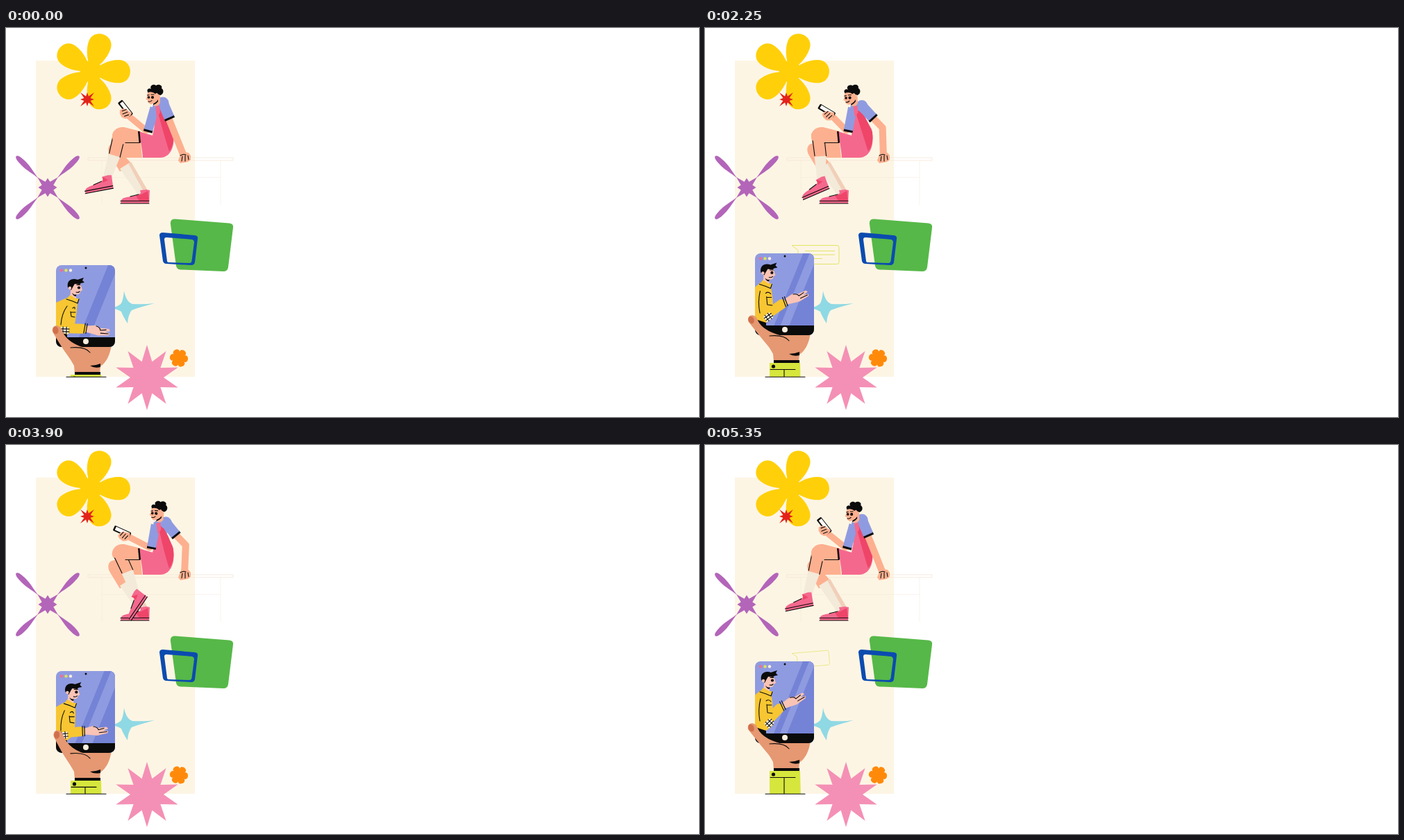
Recreate the animation shown at these times as an HTML page. Size 998 px wide and 561 px high, loop 5400 ms.

```html
<!DOCTYPE html>
<html lang="en">
<head>
<meta charset="utf-8">
<title>Chatting friends</title>
<style>
  html, body { margin: 0; width: 100%; height: 100%; overflow: hidden; background: #fff; }
  svg { display: block; width: 100%; height: 100%; }
  .ink { fill: none; stroke: #0b0b0b; stroke-width: 1.1; stroke-linecap: round; stroke-linejoin: round; }
  .limb { fill: none; stroke-linejoin: round; }
  .desk { fill: none; stroke: #f3e2d2; stroke-width: .7; }
</style>
</head>
<body>
<svg id="stage" viewBox="0 0 998 561" xmlns="http://www.w3.org/2000/svg"></svg>
<script>
const SKIN = '#fdb08f', BLUE = '#8f9be0', ROSE = '#f5688d', RED = '#ee4569';
const TAN = '#e59872', PALE = '#f9c3b5', YELLOW = '#f7c632', LIME = '#d7e63c', INK = '#0b0b0b';
const SOCK = '#f3ead9';

// ---------- shape helpers ----------
const polar = (r, deg) => [r * Math.cos(deg * Math.PI / 180), r * Math.sin(deg * Math.PI / 180)];

// Radii cycle through the list, one per vertex.
function star(x, y, vertices, radii, turn, color) {
  const points = Array.from({ length: vertices }, (_, i) => {
    const [dx, dy] = polar(radii[i % radii.length], turn + i * 360 / vertices);
    return `${(x + dx).toFixed(1)},${(y + dy).toFixed(1)}`;
  });
  return `<polygon points="${points.join(' ')}" fill="${color}"/>`;
}

function flower(x, y, petals, scale, girth, turn, color) {
  const petal = 'M0 0C12-9 26-18 43-18C67-18 67 18 43 18C26 18 12 9 0 0';
  const parts = Array.from({ length: petals }, (_, i) =>
    `<path d="${petal}" transform="rotate(${turn + i * 360 / petals}) scale(1 ${girth})"/>`);
  return `<g transform="translate(${x} ${y}) scale(${scale})" fill="${color}"><circle r="17"/>${parts.join('')}</g>`;
}

const fill = (color, d, extra = '') => `<path fill="${color}" d="${d}" ${extra}/>`;
const ink = (d, extra = '') => `<path class="ink" d="${d}" ${extra}/>`;
const limb = (id, color, width, cap = 'butt') =>
  `<path id="${id}" class="limb" stroke="${color}" stroke-width="${width}" stroke-linecap="${cap}"/>`;
const dot = (x, y, r, color) => `<circle cx="${x}" cy="${y}" r="${r}" fill="${color}"/>`;

const shoe = tongue =>
  fill(ROSE, 'M-8-1L-7 3C-13 9-31 7-35 13L-36 18H5L6-1L1-2Z') +
  (tongue ? fill(RED, 'M-14 7L-6 5L3 0L5 14H-9Z') : fill(RED, 'M-7-1L0 5L-8 7Z')) +
  ink('M-36 14.500H5M-22 8L-10 5') + ink('M-36 18H5', 'stroke-width=".7"');

// ---------- scene ----------
const decor =
  fill('#fdf5e4', 'M43 47H272V503H43Z') +
  flower(122.5, 62.7, 5, .925, 1, 0, '#ffd009') +
  star(117, 103, 16, [14, 5, 10, 5], -45, '#e3231b') +
  star(60, 230, 16, [13.5, 9, 21, 9], 0, '#b365b9') +
  [45, 135, 225, 315].map(a =>
    fill('#b365b9', 'M19 0C30-1 38-4 49-4C58-4 64-3 64 0C64 3 58 4 49 4C38 4 30 1 19 0',
      `transform="translate(60 230) rotate(${a})"`)).join('') +
  fill('#56b848', 'M244 275.5L321 281.5Q328 282 327 288L320 345Q319 351 313 351L251 348.5Q246 348 245 343L237 283Q236 275 244 275.5Z') +
  fill('#0b4bb0', 'M226 295L272 299Q277 300 276 304L272 338Q271 342 267 342L231 340Q227 340 226 336L221 299Q221 295 226 295Z' +
    'M231 302Q228 302 228 305L232 336Q232 338 235 338L264 339Q267 339 267.500 336L271 309Q271 306 268 305Z', 'fill-rule="evenodd"') +
  fill('#8fd9e4', 'M170 379Q173 395 182 398Q198 399 214 397Q191 403 181 407Q176 413 175 426Q168 415 166 409Q160 405 150 404Q162 402 166 397Q169 391 170 379Z') +
  star(203, 504, 20, [47, 24], -90, '#f490b5') +
  flower(249, 476, 6, .215, 1.25, 7, '#ff8a0a') +
  '<path class="desk" d="M118 187H327V191H118Z"/>' +
  '<path class="desk" opacity=".6" d="M138 191V255M309 191V255M138 215.500H309"/>';

const head =
  fill(SKIN, 'M213 101L222 98L222 108Q219 114 213 112Z') +
  fill(SKIN, 'M204 92L203 99L201.500 103L204 104Q204 109 209 110Q215 109 217 101L219 93Z') +
  fill(INK, 'M204 92C202 89 206 86 209 88C206 83 213 80 216 83C220 80 226 83 224 87C228 89 227 96 222 97L219 96Q218 92 215 95Q211 91 204 93Z') +
  dot(219, 98, 2.4, SKIN) + dot(205.500, 100, 1.8, INK) + dot(211, 100, 2.1, INK) +
  ink('M203.500 97L206 96.500M209 96L213 96M205 106Q208 107 210 104.500') +
  fill(INK, 'M212 109Q217 107 219 103L219 106Q216 110 212 111Z');

const woman =
  fill(SKIN, 'M194 166H158C147 166 145 175 150 184L164 207L181 196L173 187H196Z') +
  fill(SOCK, 'M164 203L180 193L205 236L190 240Z') +
  fill('#f1cfb9', 'M176 195L180 193L205 236L199 237Z') +
  `<g transform="translate(201 235)">${shoe(true)}</g>` +
  `<g id="shin">` +
    fill(SKIN, 'M-11-3C-10-8 9-9 10 6L8 31H-8Z') +
    fill(SOCK, 'M-8 29L9 29L6 63H-6Z') +
    ink('M-9.500 2L-7.500 28M8 10L9 29') +
    `<g id="foot">${shoe(false)}</g></g>` +
  fill(SKIN, 'M194 149L170 143C158 142 150 151 154 162L172 166L194 166Z') +
  ink('M172 165.500H193') +
  `<path id="shirt" fill="${BLUE}"/><path id="overalls" fill="${ROSE}"/><path id="overallsShade" fill="${RED}"/>` +
  fill(INK, 'M190 149L192.500 149L194 165L191.500 165Z') +
  limb('rightArm', SKIN, 10) + limb('rightCuff', INK, 15) + limb('rightSleeve', BLUE, 15) +
  `<circle id="shoulder" r="8.500" fill="${BLUE}"/>` +
  fill(SKIN, 'M253 178L263 180L266 184L266 190L262 193L251 195L248 191Z') +
  ink('M251 184Q256 181 259 183M254 185L253 192M258 184V192M262 184L263 190') +
  limb('forearm', SKIN, 9, 'round') + limb('leftCuff', INK, 13) + limb('leftSleeve', BLUE, 13) +
  `<path id="strap" fill="${ROSE}"/>` +
  `<g id="head">${head}</g>` +
  `<g id="handset"><rect x="-13" y="-4" width="26" height="8" rx="1.500" fill="${INK}"/>` +
    fill('#fffdf8', 'M-10.500-3H11V2H-10.500Z') +
    fill(SKIN, 'M-3 8L-2 3L2-1L5-1L11-3L13 1L12 9L7 12L1 11Z') +
    ink('M2 0L0 6M6 1L4 8M10 2L8 8', 'stroke-width=".8"') + '</g>';

const manHead =
  fill(PALE, 'M84 22H99L102 31L99 33Q99 38 93 37L93 44L84 42L85 32Z') +
  fill(INK, 'M81 27C79 17 87 13 95 16L104 13L102 17L105 20L100 21L98 23L91 22L88 27L86 31Z') +
  dot(84, 28, 2.2, PALE) + dot(97, 27.500, 2.1, INK) +
  ink('M94 23.500L99 23.500M93 34Q96 35 98 33') + fill(INK, 'M87 35Q91 39 93 37L93 40Q89 40 87 35Z');

const device =
  '<g id="bubble" fill="none" stroke="#e2e465" stroke-width="1">' +
    '<path d="M0 0H65Q68 0 68 3V24Q68 27 65 27H12Q9 27 9 24V7Z"/>' +
    '<path id="bubbleText" d="M19 8H62M19 13.500H62M19 19H44"/></g>' +
  fill(TAN, 'M80 114L98 145L99 156H135L136 146Q149 137 152 114Z') +
  fill(INK, 'M99 154H136V158H99ZM121 145Q129 145 136 142V147Q127 149 121 145Z') +
  fill(LIME, 'M93 158H137L138 200H93Z') + dot(98.500, 163, 2.6, INK) + ink('M94 167.500H130M114 168V200') +
  '<g clip-path="url(#screen)">' +
    `<rect x="72" width="85" height="118" fill="${BLUE}"/>` +
    '<path id="glassShade" fill="#7583d6"/><path id="glassShine" fill="#8f9be0"/>' +
    dot(80, 7.500, 2.2, '#ee6f91') + dot(86.500, 7.500, 2.2, '#dbe25a') + dot(93, 7.500, 2.2, '#fbeee0') + dot(115, 4, 1.5, INK) +
    fill(INK, 'M72 92H88V105H72Z') +
    `<path id="jacket" fill="${YELLOW}"/>` +
    `<g id="manHead">${manHead}` +
      fill(YELLOW, 'M79 44L84 38L92 43L97 43L95 50L88 47Z') + ink('M79 44L88 47L95 50L97 44') + '</g>' +
    limb('sleeve', YELLOW, 14, 'round') +
    '<path id="jacketLines" class="ink"/>' +
    `<g id="palm">` + fill(PALE, 'M-3-4L10-7L16-4L29-5L31-2L24 0L31 1L30 4L15 7L-3 5Z') +
      ink('M10-6Q16-5 17-1L25-3M18 3L29 2') + ink('M-3-7V7M-6-7V7') + '</g>' +
    `<g id="patch"><rect x="-6" y="-4.500" width="11" height="9" fill="#fff8ec"/>` + ink('M-6-2H6M-6 2H6M-3-5V5M2-5V5') + '</g>' +
    fill(INK, 'M72 104H157V118H72Z') + dot(115, 110, 4, '#fdeede') + '</g>' +
  `<path id="thumb" fill="${TAN}"/><ellipse id="nail" rx="4" ry="5.500" fill="#d0704c"/>` +
  ink('M93 119Q114 117 121 126', 'stroke-width="1.500"');

const stage = document.getElementById('stage');
stage.innerHTML =
  '<defs><clipPath id="ground"><path d="M0 0H998V503H0Z"/></clipPath>' +
  '<clipPath id="screen"><rect x="72" width="85" height="118" rx="8"/></clipPath></defs>' +
  decor + woman + `<g clip-path="url(#ground)"><g id="device">${device}</g></g>` + ink('M87 503.300H144');

// ---------- motion ----------
const parts = Object.fromEntries([...stage.querySelectorAll('[id]')].map(el => [el.id, el]));
const set = (id, name, value) => parts[id].setAttribute(name, value);
const mix = (a, b, k) => a + (b - a) * k;
const ramp = (t, from, to) => {
  const k = Math.min(1, Math.max(0, (t - from) / (to - from)));
  return k * k * (3 - 2 * k);
};

// Smooth periodic curve through the given values, without overshoot.
function track(times, period, values) {
  const n = times.length;
  const at = i => times[(i + n) % n] + period * Math.floor(i / n);
  const value = i => values[(i + n) % n];
  const slope = i => (value(i + 1) - value(i)) / (at(i + 1) - at(i));
  const tangent = i => {
    const a = slope(i - 1), b = slope(i);
    return a * b <= 0 ? 0 : 2 * a * b / (a + b);
  };
  return t => {
    let i = n - 1;
    while (times[i] > t) i--;
    const h = at(i + 1) - at(i), k = (t - at(i)) / h;
    return mix(value(i), value(i + 1), k * k * (3 - 2 * k)) +
      h * k * (1 - k) * ((1 - k) * tangent(i) - k * tangent(i + 1));
  };
}

const LOOP = 5400, SWING = 2700, LIFT = 4500;
const sit = (...v) => track([0, 850, 1750, 2800, 3450, 4300], LOOP, v);
const hold = (...v) => track([0, 850, 1750, 2800, 3450, 4300], LIFT, v);

const sitting = {
  headX: sit(0, -5, -6.5, 4.5, 7, 2.5), headY: sit(0, 1, 1.5, -1, -1, -1), headTurn: sit(0, -6, -8, 3, 6, 2),
  lean: sit(0, -3, -4, 2, 3, 0),
  shoulderX: sit(226, 222, 222, 231, 232, 228), shoulderY: sit(108, 111, 111, 114, 114, 110),
  cuffX: sit(235, 237, 237, 246, 246, 241),
  elbowX: sit(241, 250, 252, 260, 262, 254), elbowY: sit(147, 143, 142, 146, 146, 143),
  leftX: sit(205, 204, 204, 210, 211, 208),
  handX: sit(172, 177, 179, 169.5, 167, 167.5), handY: sit(116, 114, 115.5, 124, 126, 123),
  handTurn: sit(52, 43, 39, 22, 20, 31)
};
const holding = {
  y: track([0, 850, 1750, 2275, 2800, 3450, 4300], LIFT, [342, 312, 321.5, 325, 321.5, 314, 339.5]),
  headX: hold(8, 0, -2, 1, 0, 8), headY: hold(5, 0, 0, 1, 0, 5.5),
  elbowX: hold(84, 92, 93, 86, 82, 83), elbowY: hold(91, 86, 88, 89, 88, 91),
  wristX: hold(119, 116, 121, 117, 115, 118), wristY: hold(92, 62, 66, 71, 80, 91),
  palmTurn: hold(10, -25, -21, -19, -15, 9),
  thumbX: hold(73, 68, 66, 72, 75, 74), thumbY: hold(93, 95, 97, 92, 91, 92)
};
const pose = (tracks, t) => Object.fromEntries(Object.entries(tracks).map(([k, f]) => [k, f(t)]));
const line = (x1, y1, x2, y2) => `M${x1} ${y1}L${x2} ${y2}`;

// A sleeve from a to b, with a dark cuff slightly past its end.
function drawSleeve(sleeve, cuff, ax, ay, bx, by) {
  const len = Math.hypot(bx - ax, by - ay), ux = (bx - ax) / len, uy = (by - ay) / len;
  set(sleeve, 'd', line(ax, ay, bx, by));
  set(cuff, 'd', line(bx - ux, by - uy, bx + ux * 3, by + uy * 3));
}

function drawWoman(t) {
  const p = pose(sitting, t), s = p.lean;
  const leg = 4.5 - 24 * Math.cos(2 * Math.PI * (t - 200) / SWING);
  const bend = Math.max(0, leg);
  const tilt = 21 + .6 * leg + .05 * bend * bend;
  set('shin', 'transform', `translate(164 156) rotate(${-leg})`);
  set('foot', 'transform', `translate(0 61) rotate(${leg - tilt})`);

  set('shirt', 'd', `M${211 + s} 112L${219 + s} 106L${230 + s} 107L232 135L215 150L${212 + s} 130Z`);
  set('overalls', 'd', `M191 149L211 155L${215 + s} 136L${217 + s} 112H${222 + s}L240 146C245 168 238 187 222 187H197Q196 172 191 149Z`);
  set('overallsShade', 'd', `M${222 + s} 113L${233 + s / 2} 132L241 150Q243 168 235 178Q228 156 ${220 + s} 126Z`);
  set('strap', 'd', `M${215 + s} 113L${221 + s} 112L${222 + s} 122L${217 + s} 128Z`);

  set('rightArm', 'd', `M${p.cuffX - 2} 127L${p.elbowX} ${p.elbowY}L257 187`);
  drawSleeve('rightSleeve', 'rightCuff', p.shoulderX, p.shoulderY, p.cuffX, 129);
  set('shoulder', 'cx', p.shoulderX);
  set('shoulder', 'cy', p.shoulderY);

  const a = p.handTurn * Math.PI / 180, cos = Math.cos(a), sin = Math.sin(a);
  set('forearm', 'd', line(p.leftX - 3, 148, p.handX + 12 * cos - 3 * sin, p.handY + 12 * sin + 3 * cos));
  drawSleeve('leftSleeve', 'leftCuff', 214 + s, 115, p.leftX, 147);
  set('handset', 'transform', `translate(${p.handX} ${p.handY}) rotate(${p.handTurn})`);
  set('head', 'transform', `translate(${p.headX} ${p.headY}) rotate(${p.headTurn} 215 105)`);
}

function drawDevice(t) {
  const p = pose(holding, t), { headX: x, headY: y, thumbX: tx, thumbY: ty } = p;
  set('device', 'transform', `translate(0 ${p.y})`);

  const size = ramp(t, 550, 980) * (1 - ramp(t, 2400, 2900));
  set('bubble', 'transform', `translate(125 -11.500) rotate(${-22 * (1 - size)}) scale(${size})`);
  set('bubble', 'opacity', .5 + .5 * size);
  set('bubbleText', 'opacity', ramp(t, 950, 1350) * size);

  const k = Math.min(1, (342 - p.y) / 18);
  const shade = mix(147, 141, k), shine = mix(162, 150, k), wide = mix(60, 10, k);
  set('glassShade', 'd', `M${shade} 0H220V104H${shade - 42}Z`);
  set('glassShine', 'd', `M${shine} 0h${wide}l-42 104h${-wide}Z`);

  set('jacket', 'd', `M70 ${50 + y}L${80 + x} ${42 + y}L${95 + x} ${47 + y}Q${99 + x / 2} 62 98 92L88 100L70 94Z`);
  set('manHead', 'transform', `translate(${x} ${y})`);
  set('sleeve', 'd', `M${81 + x / 2} ${60 + y}L${p.elbowX - 2} ${p.elbowY}L${p.wristX - 9} ${p.wristY + (p.elbowY - p.wristY) * .25}`);
  set('jacketLines', 'd', `M${80 + x} ${54 + y}Q${76 + x / 2} 70 79 86M${88 + x} ${57 + y}Q${92 + x} ${54 + y} ${95 + x / 2} ${58 + y}` +
    `M${89 + x / 2} ${62 + y}L${90 + x / 2} 74L${97 + x / 4} 75M${90 + x / 2} ${63 + y}H${96 + x / 2}`);
  const turn = Math.atan2(p.wristY - p.elbowY, p.wristX - p.elbowX) * 180 / Math.PI;
  set('palm', 'transform', `translate(${p.wristX} ${p.wristY}) rotate(${p.palmTurn})`);
  set('patch', 'transform', `translate(${p.elbowX + 1} ${p.elbowY + 3}) rotate(${turn})`);

  set('thumb', 'd', `M${tx - 6} ${ty + 3}C${tx - 8} ${ty - 8} ${tx + 5} ${ty - 9} ${tx + 8} ${ty + 2}` +
    `Q${tx + 16} 114 120 121V130L98 142Q84 126 ${tx - 6} ${ty + 3}Z`);
  set('nail', 'transform', `translate(${tx - 1.5} ${ty + 1}) rotate(${(tx - 74) * 4})`);
}

const STEP = 50;
const start = performance.now();
function tick() {
  const elapsed = (performance.now() - start) % LOOP;
  const t = Math.floor(elapsed / STEP) * STEP;
  drawWoman(t);
  drawDevice(t % LIFT);
  requestAnimationFrame(tick);
}
tick();
</script>
</body>
</html>
```
